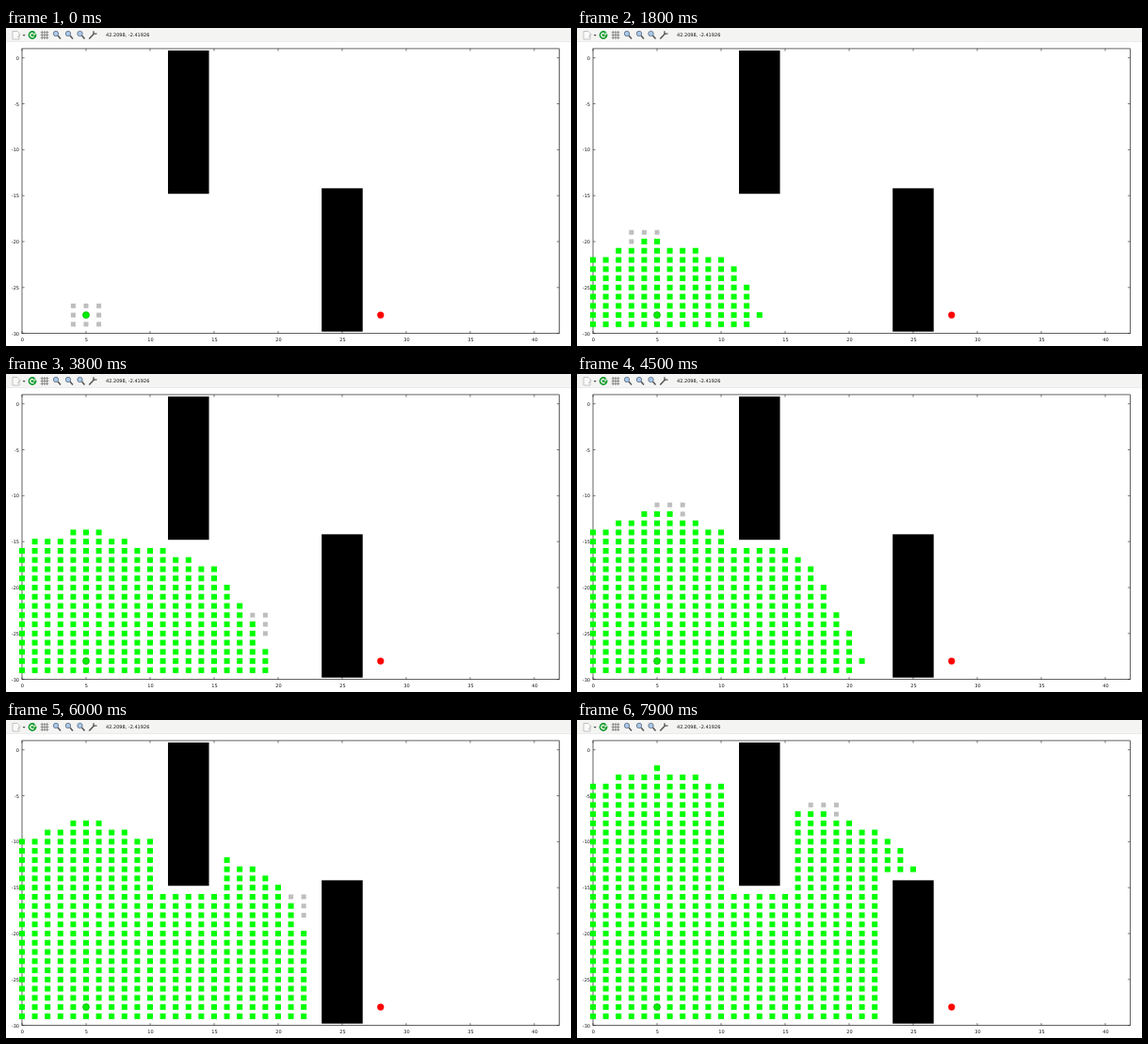
Recreate the animation shown at these times as an HTML page with a canvas. Size 600 by 338 pixels, loop 8000 ms.

```html
<!DOCTYPE html>
<html lang="en">
<head>
<meta charset="utf-8">
<title>Dijkstra grid search</title>
<style>
html, body { margin: 0; width: 100%; height: 100%; overflow: hidden; background: #fff; }
canvas { display: block; width: 600px; height: 338px; }
</style>
</head>
<body>
<canvas id="stage" width="600" height="338"></canvas>
<script>
const ctx = document.getElementById('stage').getContext('2d');
const LOOP = 8000, HOLD = 500, STEP = 100;
const START = { x: 5, y: -28 }, GOAL = { x: 28, y: -28 };
// [step, cells expanded so far]: the search slows as the plot fills up
const PACE = [[0, 1], [14, 110], [22, 170], [34, 256], [49, 358], [64, 460], [75, 527]];
const WALLS = [
  { x0: 11.4, x1: 14.6, y0: -14.8, y1: 0.8 },
  { x0: 23.4, x1: 26.6, y0: -29.8, y1: -14.2 }
];
const CLEARANCE = 0.7;

const px = x => 17 + x * 13.6;
const py = y => 31.7 - y * 9.765;
const key = c => c.x + ',' + c.y;

function isFree({ x, y }) {
  return x >= 0 && x < 42 && y > -30 && y < 1 && !WALLS.some(w =>
    x > w.x0 - CLEARANCE && x < w.x1 + CLEARANCE &&
    y > w.y0 - CLEARANCE && y < w.y1 + CLEARANCE);
}

function neighbours(c) {
  const list = [];
  for (let dx = -1; dx <= 1; dx++)
    for (let dy = -1; dy <= 1; dy++) {
      const n = { x: c.x + dx, y: c.y + dy };
      if ((dx || dy) && isFree(n)) list.push({ ...n, length: Math.hypot(dx, dy) });
    }
  return list;
}

// Equal costs alternate between columns so that no side of the front leads.
const tieRank = c => (c.x > START.x) + c.x % 2;
function comesBefore(a, b) {
  const diff = a.cost - b.cost;
  if (Math.abs(diff) > 1e-6) return diff < 0;
  return (tieRank(a) - tieRank(b) || a.x - b.x || b.y - a.y) < 0;
}

function search(limit) {
  const open = new Map([[key(START), { ...START, cost: 0 }]]);
  const rank = new Map(), order = [];
  while (open.size && order.length < limit) {
    const current = [...open.values()].reduce((a, b) => comesBefore(b, a) ? b : a);
    open.delete(key(current));
    rank.set(key(current), order.length);
    order.push(current);
    for (const n of neighbours(current)) {
      const id = key(n), cost = current.cost + n.length;
      if (!rank.has(id) && (!open.has(id) || cost < open.get(id).cost))
        open.set(id, { x: n.x, y: n.y, cost });
    }
  }
  return { order, rank };
}
const { order, rank } = search(PACE[PACE.length - 1][1]);

function expandedAt(step) {
  const i = Math.max(1, PACE.findIndex(p => p[0] >= step));
  const [s0, n0] = PACE[i - 1], [s1, n1] = PACE[i];
  return Math.round(n0 + (n1 - n0) * (step - s0) / (s1 - s0));
}

function line(color, width, ...points) {
  ctx.strokeStyle = color;
  ctx.lineWidth = width;
  ctx.beginPath();
  points.forEach(([x, y]) => ctx.lineTo(x, y));
  ctx.stroke();
}

function disc(x, y, r, fill, stroke, width = 0.6) {
  ctx.beginPath();
  ctx.arc(x, y, r, 0, Math.PI * 2);
  ctx.fillStyle = fill;
  ctx.fill();
  if (stroke) {
    ctx.strokeStyle = stroke;
    ctx.lineWidth = width;
    ctx.stroke();
  }
}

function cell(c, size, color) {
  ctx.fillStyle = color;
  ctx.fillRect(px(c.x) - size / 2, py(c.y) - size / 2, size, size);
}

function text(s, x, y, align) {
  ctx.font = '5px "DejaVu Sans", sans-serif';
  ctx.fillStyle = '#111';
  ctx.textAlign = align;
  ctx.fillText(s, x, y);
}

function magnifier(x) {
  line('#555', 1.5, [x + 1, 8], [x + 4, 11.5]);
  disc(x - 1, 6, 2.7, '#a9c8e8', '#68788c', 0.9);
}

function toolbar() {
  ctx.fillStyle = '#f4f4f3';
  ctx.fillRect(0, 0, 600, 14.5);
  line('#e2e2e2', 0.6, [0, 14.5], [600, 14.5]);

  ctx.fillStyle = '#fafafa';
  ctx.fillRect(7, 3.5, 7, 8.5);
  line('#b5b5b5', 0.8, [7, 3.5], [12, 3.5], [14, 5.5], [14, 12], [7, 12], [7, 3.5]);
  line('#b5b5b5', 0.8, [12, 10], [15.5, 6.5]);
  ctx.fillStyle = '#444';
  ctx.beginPath();
  ctx.moveTo(17.6, 7); ctx.lineTo(20.6, 7); ctx.lineTo(19.1, 8.8);
  ctx.fill();

  disc(28, 7.5, 4.4, '#149a2c');
  ctx.beginPath();
  ctx.arc(28, 7.5, 2.1, 0.7, 5.3);
  ctx.strokeStyle = '#fff';
  ctx.lineWidth = 1.2;
  ctx.stroke();
  line('#fff', 1, [28.4, 7], [31, 7], [31, 4.5]);

  for (const d of [-2.7, 0, 2.7]) {
    line('#777', 0.8, [41 + d, 3], [41 + d, 12]);
    line('#777', 0.8, [36.7, 7.5 + d], [45.3, 7.5 + d]);
  }
  [54, 67, 79.5].forEach(magnifier);

  line('#555', 1.5, [88.3, 11.5], [93.5, 6]);
  line('#555', 1.3, [93, 3.2], [93, 6.2], [96.5, 6.2]);
  text('42.2098, -2.41926', 106, 9.4, 'left');
}

function axes() {
  const left = px(0), right = 587.5, top = py(1), bottom = py(-30), tick = 2.6;
  ctx.strokeStyle = '#222';
  ctx.lineWidth = 0.7;
  ctx.strokeRect(left, top, right - left, bottom - top);
  for (let x = 0; x <= 40; x += 5) {
    line('#222', 0.6, [px(x), bottom], [px(x), bottom - tick]);
    line('#222', 0.6, [px(x), top], [px(x), top + tick]);
    text(x, px(x) + 0.4, 333, 'center');
  }
  for (let y = 0; y >= -30; y -= 5) {
    line('#222', 0.6, [left, py(y)], [left + tick, py(y)]);
    line('#222', 0.6, [right, py(y)], [right - tick, py(y)]);
    text(y, 14, py(y) + 2, 'right');
  }
}

function draw(time) {
  const step = time < HOLD ? 0 : Math.floor((time - HOLD) / STEP) + 1;
  const count = expandedAt(step);
  ctx.fillStyle = '#fff';
  ctx.fillRect(0, 0, 600, 338);
  toolbar();
  axes();

  ctx.fillStyle = '#000';
  for (const w of WALLS)
    ctx.fillRect(px(w.x0), py(w.y1), px(w.x1) - px(w.x0), py(w.y0) - py(w.y1));

  for (const n of neighbours(order[count - 1]))
    if (!(rank.get(key(n)) < count)) cell(n, 5, '#bebebe');
  if (count > 1)
    for (const c of order.slice(0, count)) cell(c, 6, '#0f0');

  disc(px(START.x), py(START.y), 3.5, '#00f000', '#00a800');
  disc(px(GOAL.x), py(GOAL.y), 3.6, '#f00');
}

function frame() {
  draw(performance.now() % LOOP);
  requestAnimationFrame(frame);
}
frame();
</script>
</body>
</html>
```
